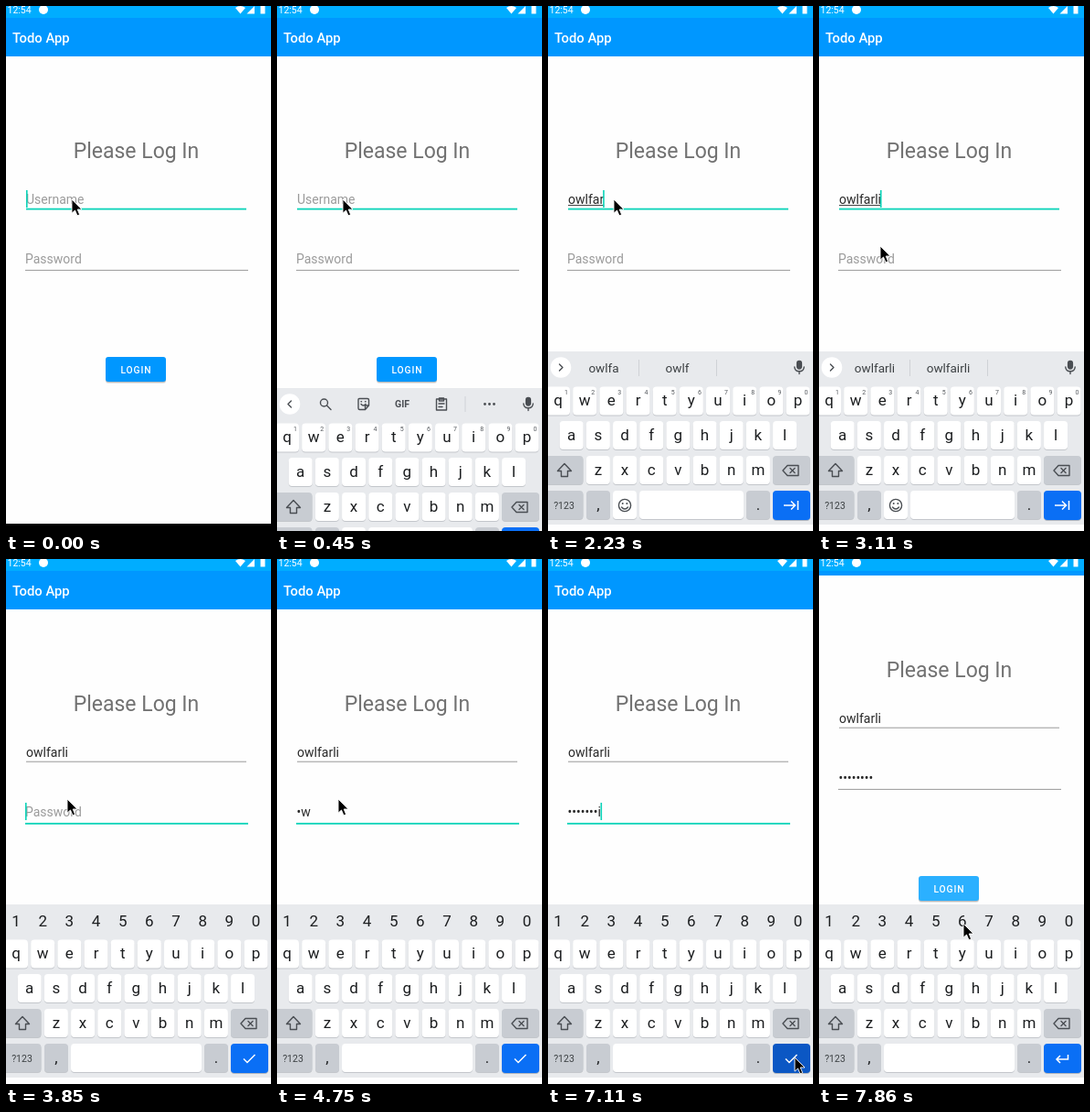
An HTML page for the animation above (8000 ms loop, 290 by 573 pixels).

```html
<!DOCTYPE html>
<html lang="en">
<head>
<meta charset="utf-8">
<title>Log in</title>
<style>
  html, body { margin: 0; width: 100%; height: 100%; overflow: hidden; background: #fefefe; }
  svg { display: block; width: 290px; height: 573px; font-family: Roboto, sans-serif; }
  .mid { text-anchor: middle; }
  .field { font-size: 14px; fill: #2a2a2a; }
  .hint { font-size: 14px; fill: #9b9b9b; }
  .line { stroke: none; fill: #9a9a9a; }
  .line.on { fill: #0ad3b8; }
  .caret { fill: #0ad3b8; }
  .key { font-size: 17px; fill: #1c1e20; text-anchor: middle; }
  .sup { font-size: 7px; fill: #55595e; text-anchor: middle; }
  .word { font-size: 13.5px; fill: #3c4043; text-anchor: middle; }
  .icon { fill: none; stroke: #4a4e53; stroke-width: 1.4; stroke-linecap: round; stroke-linejoin: round; }
  .solid { fill: #4a4e53; }
  .glyph { fill: none; stroke: #fff; stroke-width: 1.5; }
</style>
</head>
<body>
<svg viewBox="0 0 290 573">
  <rect width="290" height="573" fill="#fefefe"/>

  <g id="app">
    <rect y="13" width="290" height="42" fill="#0097ff"/>
    <text x="7" y="40" font-size="14.8" font-weight="500" fill="#fff">Todo App</text>
    <text class="mid" x="142.5" y="166" font-size="23" fill="#727272">Please Log In</text>

    <text id="userHint" class="hint" x="22" y="216">Username</text>
    <text id="user" class="field" x="22" y="216"></text>
    <rect id="compose" x="22" y="217" height="1" fill="#444"/>
    <rect id="userCaret" class="caret" y="201" width="1.6" height="19"/>
    <rect id="userLine" class="line" x="22" width="241"/>

    <text id="passHint" class="hint" x="21" y="281">Password</text>
    <text id="pass" class="field" x="21.5" y="281"></text>
    <rect id="passCaret" class="caret" y="266" width="1.6" height="19"/>
    <rect id="passLine" class="line" x="21" width="244"/>

    <rect x="109" y="385" width="66" height="27" rx="3" fill="#000" opacity=".1"/>
    <rect x="109" y="384" width="66" height="27" rx="3" fill="#000" opacity=".18"/>
    <rect id="login" x="109" y="383" width="66" height="27" rx="3"/>
    <text class="mid" x="142.5" y="400.7" font-size="10.3" font-weight="500" letter-spacing=".92" fill="#fff">LOGIN</text>
  </g>

  <rect width="290" height="13" fill="#00adff"/>
  <g fill="#fff">
    <text x="1.5" y="8" font-size="10.5">12:54</text>
    <circle cx="41" cy="4" r="5"/>
    <path d="M251 2Q256.500-2 262 2L256.500 8.500Z"/>
    <path d="M272 0V8.500H263.500Z"/>
    <path d="M278.500 0H283.500V8.500H278.500Z"/>
  </g>

  <rect id="nav" y="565" width="290" height="8" fill="#000"/>

  <g id="board">
    <rect y="377" width="290" height="189" fill="#e8eaed"/>
    <rect y="566" width="290" height="7" fill="#fefefe"/>
    <g id="keys"></g>
    <g id="emoji">
      <g class="icon">
        <circle cx="84" cy="545" r="6.600"/>
        <path d="M80.500 547Q84 551 87.500 547"/>
      </g>
      <circle class="solid" cx="81.700" cy="543" r="1"/>
      <circle class="solid" cx="86.300" cy="543" r="1"/>
    </g>
    <g class="icon">
      <path d="M18 499.500L10.500 507.500H14.500V513.500H21.500V507.500H25.500Z"/>
      <path d="M262 501.500H274V512.500H262L257 507ZM265 504.500L270 509.500M270 504.500L265 509.500"/>
    </g>
    <rect x="246" y="530" width="41" height="32" rx="4" fill="#b4b8be"/>
    <rect id="enter" x="246" y="529" width="41" height="32" rx="4"/>
    <path id="enterIcon" class="glyph"/>

    <g id="numbers"></g>
    <g id="bar">
      <circle cx="14" cy="394.500" r="11.300" fill="#fff"/>
      <path id="chevron" class="icon"/>
      <g class="icon">
        <rect x="272.600" y="387.500" width="4.800" height="8.500" rx="2.400" fill="#4a4e53"/>
        <path d="M269.800 394Q270 398.800 275 398.800Q280 398.800 280.200 394M275 399V401.500"/>
      </g>
    </g>
    <g id="tools">
      <g class="icon">
        <circle cx="51.500" cy="393" r="4"/>
        <path d="M54.500 396L59 400.500"/>
        <path d="M89 389.500Q89 388.500 90 388.500H99Q100.500 388.500 100.500 390V396L96.500 400.500H90.500Q89 400.500 89 399ZM100.500 396H96.500V400.500M92 394.500Q94.500 397.500 97 394.500M92 391.800H92.500M96.500 391.800H97"/>
        <path d="M174.500 389H185.500V401H174.500ZM177.500 388H182.500V391H177.500ZM177 394H183M177 397.500H181"/>
      </g>
      <text class="mid solid" x="137" y="398" font-size="10.500" font-weight="700">GIF</text>
      <path d="M206 386V403" stroke="#cfd2d6"/>
      <g class="solid">
        <circle cx="227.500" cy="394.500" r="1.400"/><circle cx="232.500" cy="394.500" r="1.400"/><circle cx="237.500" cy="394.500" r="1.400"/>
      </g>
    </g>
    <g id="words">
      <path d="M99.500 386V404M184.500 386V404" stroke="#cfd2d6"/>
      <text class="word" x="61" y="399.500"></text>
      <text class="word" x="141.500" y="399.500"></text>
      <text class="word" x="227" y="399.500"></text>
    </g>
  </g>

  <path id="mouse" d="M0 0V15.200L3.500 12L6 17.800L8.600 16.700L6.200 11H11Z" fill="#000" stroke="#fff" stroke-width=".9"/>
</svg>

<script>
const LOOP = 8000, NAME = 'owlfarli', PITCH = 29.17;
const $ = id => document.getElementById(id);
const show = (id, on) => $(id).setAttribute('display', on ? 'inline' : 'none');
const set = (id, attrs) => { for (const k in attrs) $(id).setAttribute(k, attrs[k]); };

// Keyboard
const cap = (x, y, w, fill, id = '') =>
  `<rect x="${x}" y="${y + 1}" width="${w}" height="31" rx="4" fill="#c3c6cb"/>` +
  `<rect ${id} x="${x}" y="${y}" width="${w}" height="31" rx="4" fill="${fill}"/>`;
const label = (x, y, s, cls = 'key') => `<text class="${cls}" x="${x}" y="${y}">${s}</text>`;
const row = (letters, x0, y) => [...letters].map((c, i) => {
  const x = x0 + i * PITCH;
  return cap(x - 13, y, 26, '#fff') + label(x, y + 20.5, c);
}).join('');
const digits = [...'1234567890'];
const GREY = '#c8ccd2';

$('keys').innerHTML =
  row('qwertyuiop', 11, 415.5) + row('asdfghjkl', 25.7, 453) + row('zxcvbnm', 54.9, 491) +
  cap(-4, 491, 42.5, GREY) + cap(246, 491, 41, GREY) +
  cap(-4, 529, 42.5, GREY) + cap(42, 529, 26, GREY) + cap(217, 529, 26, GREY) +
  `<g id="shortSpace">${cap(71, 529, 26, '#fff')}${cap(100, 529, 114, '#fff')}</g>` +
  `<g id="longSpace">${cap(71, 529, 143, '#fff')}</g>` +
  `<text class="mid" x="17.500" y="549" font-size="10.500" fill="#3c4043">?123</text>` +
  label(55, 550, ',') + label(230, 550, '.') +
  `<g id="sups">${digits.map((d, i) => label(20 + i * PITCH, 424, d, 'sup')).join('')}</g>`;
$('numbers').innerHTML = digits.map((d, i) => label(11 + i * PITCH, 401, d)).join('');

const ICONS = {
  next: 'M258 545H270M266 540.500L270.500 545L266 549.500M273.500 540V550',
  check: 'M260 545.500L264 549.500L272.500 541',
  back: 'M272.500 541V546H260M264 542L260 546L264 550'
};

// Stepped tracks: [start, value]
const typed = [[0, 0], [600, 1], [900, 2], [1040, 3], [1790, 4], [1940, 5], [2230, 6], [2380, 7], [2530, 8]];
const secret = [[0, 0], [4000, 1], [4300, 2], [5350, 3], [5500, 5], [5650, 6], [5790, 7], [5930, 8]];
const blink = [[0, 1], [150, 0], [600, 1], [3550, 0], [3850, 1], [4750, 0], [5050, 1], [6530, 0], [6970, 1], [7410, 0]];
const ideas = [
  [0, ['owl', 'owls', 'owlet']], [1790, ['owlf', 'owl', 'owls']], [2090, ['owlfa', 'owlf', '']],
  [2380, ['owlfarl', 'owlfar', '']], [2670, ['owlfarli', 'owlfar', '']], [2820, ['owlfarli', 'owlfairli', '']]
];
const mouse = [
  [0, [72, 211]], [2960, [69, 240]], [3110, [67, 262]],
  [6380, [84, 290]], [6530, [136, 372]], [6680, [202, 462]], [6820, [250, 522]], [6970, [270, 544]],
  [7560, [252, 520]], [7710, [194, 440]], [7860, [158, 398]]
];
const slide = [[0, 196], [450, 40], [600, 0]];
const at = (track, t) => track.reduce((v, [from, val]) => t >= from ? val : v, track[0][1]);

function line(id, y, on) {
  $(id).setAttribute('class', on ? 'line on' : 'line');
  set(id, { y, height: on ? 1.8 : 1 });
}

function draw(t) {
  const passFocus = t >= 3260 && t < 7410, userFocus = t < 3260, done = t >= 7410;
  const numeric = t >= 3850, hints = t >= 1340;
  const n = at(typed, t), p = at(secret, t), caret = at(blink, t);

  $('user').textContent = NAME.slice(0, n);
  const masked = done || (t >= 5050 && t < 5350);
  $('pass').textContent = masked ? '•'.repeat(p) : '•'.repeat(Math.max(0, p - 1)) + NAME.slice(Math.max(0, p - 1), p);
  const uw = n ? $('user').getComputedTextLength() : 0;
  const pw = p ? $('pass').getComputedTextLength() : 0;
  show('userHint', !n);
  show('passHint', !p);
  show('compose', n && userFocus);
  set('compose', { width: uw });
  show('userCaret', userFocus && caret);
  set('userCaret', { x: 22 + Math.max(0, uw - 1) });
  show('passCaret', passFocus && caret);
  set('passCaret', { x: 21 + pw });
  line('userLine', 220.7, userFocus);
  line('passLine', 287.9, passFocus);

  set('app', { transform: `translate(0 ${done ? -37 : 0})` });
  set('login', { fill: done ? '#2bb0ff' : '#0097ff' });

  show('board', t >= 450);
  set('board', { transform: `translate(0 ${at(slide, t)})` });
  show('nav', t < 450);
  for (const id of ['sups', 'emoji', 'shortSpace', 'bar']) show(id, !numeric);
  for (const id of ['numbers', 'longSpace']) show(id, numeric);
  show('tools', !hints);
  show('words', hints && !numeric);
  set('chevron', { d: hints ? 'M12.500 391L16 394.500L12.500 398' : 'M15.500 391L12 394.500L15.500 398' });
  document.querySelectorAll('.word').forEach((w, i) => w.textContent = at(ideas, t)[i]);
  set('enter', { fill: t >= 7110 && t < 7260 ? '#0b57c4' : '#0a6ff5' });
  set('enterIcon', { d: ICONS[done ? 'back' : numeric ? 'check' : 'next'] });

  set('mouse', { transform: `translate(${at(mouse, t)})` });
}

const start = performance.now();
function tick() {
  draw((performance.now() - start) % LOOP);
  requestAnimationFrame(tick);
}
tick();
</script>
</body>
</html>
```
